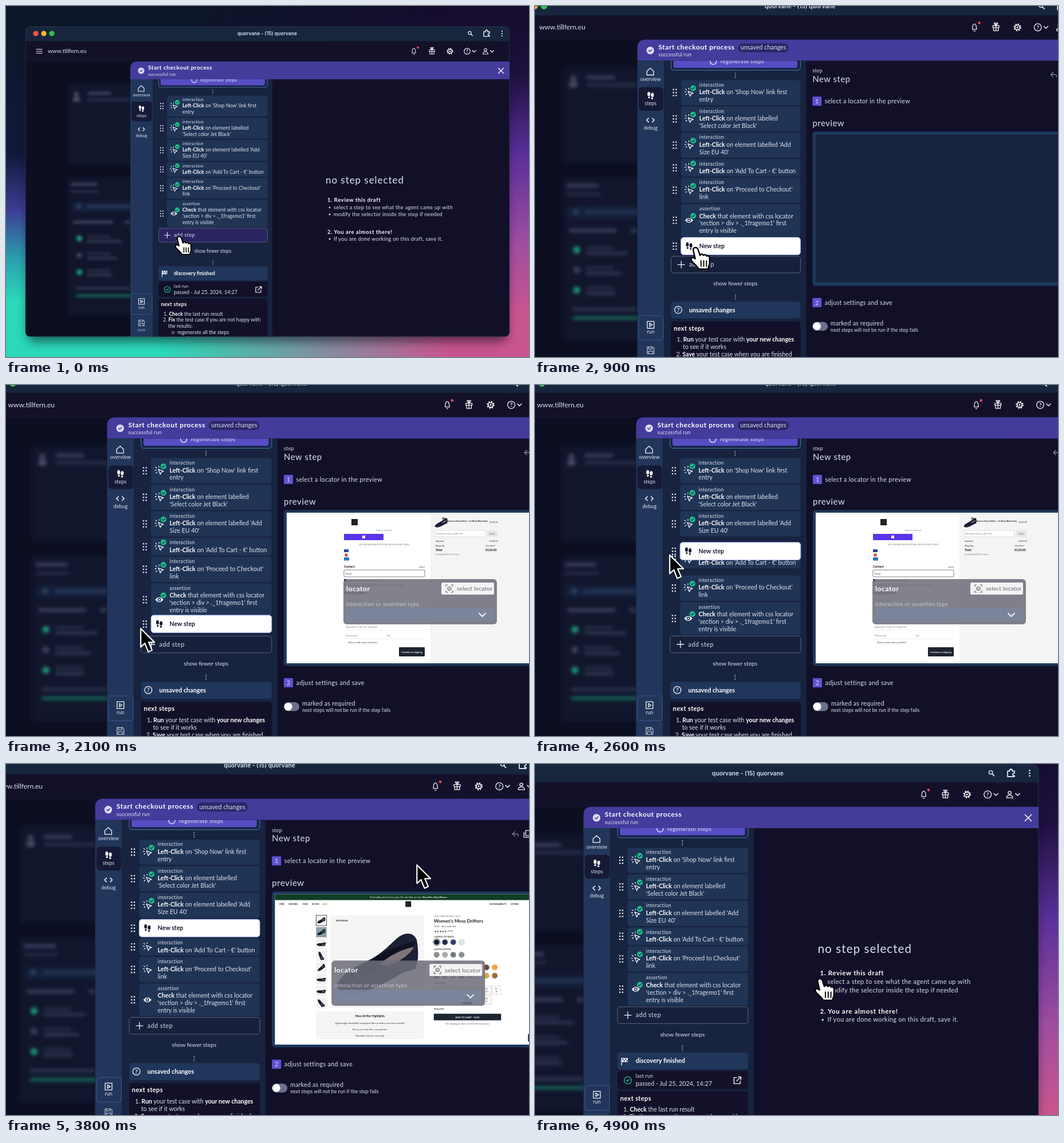
An HTML page that plays this animation: 913 by 613 pixels, repeating every 5 s.

```html
<!DOCTYPE html>
<html lang="en">
<head>
<meta charset="utf-8">
<title>Step editor</title>
<style>
  html, body { margin: 0; width: 100%; height: 100%; overflow: hidden; background: #0c1426; }
  svg { display: block; width: 100vw; height: 100vh; font-family: Lato, sans-serif; }
  text { white-space: pre; }
</style>
</head>
<body>
<svg id="stage" viewBox="0 0 913 613" fill="#dde2f0"></svg>
<script>
const stage = document.getElementById('stage');
const LOOP = 5000, FRAME = 100, ROW = 27.3;

// Drawing helpers; *stars* make bold text
const T = (x, y, size, str, o = '') =>
  `<text x="${x}" y="${y}" font-size="${size}" ${o}>${
    str.replace(/\*(.+?)\*/g, '<tspan font-weight="700" fill="#fff">$1</tspan>')}</text>`;
const S = (x, y, size, str, c = '#333', o = '') => T(x, y, size, str, `fill="${c}" ${o}`);
const R = (x, y, w, h, fill, r = 0, o = '') =>
  `<rect x="${x}" y="${y}" width="${w}" height="${h}" rx="${r}" fill="${fill}" ${o}/>`;
const C = (x, y, r, fill, o = '') => `<circle cx="${x}" cy="${y}" r="${r}" fill="${fill}" ${o}/>`;
const L = (d, w = 1.1, color = '#f2f3fa') =>
  `<path d="${d}" fill="none" stroke="${color}" stroke-width="${w}" stroke-linecap="round" stroke-linejoin="round"/>`;
const P = (d, fill, o = '') => `<path d="${d}" fill="${fill}" ${o}/>`;
const G = (id, body, o = '') => `<g id="${id}" ${o}>${body}</g>`;
const ring = (x, y, r, color = '#f2f3fa', w = 1.1) => C(x, y, r, 'none', `stroke="${color}" stroke-width="${w}"`);
const times = (n, f) => Array.from({ length: n }, (_, i) => f(i)).join('');
const each = (list, f) => list.map(f).join('');
const gap = n => `letter-spacing="${n}"`;
const MID = 'text-anchor="middle"', BOLD = 'font-weight="700"', MIDBOLD = MID + ' ' + BOLD;

// Icons
const tick = (x, y, color = '#fff', w = 1) => L(`M${x - 2} ${y}l1.5 1.6 2.6-3`, w, color);
const cross = (x, y, r, w = 1.4) => L(`M${x - r} ${y - r}l${2 * r} ${2 * r}M${x + r} ${y - r}l${-2 * r} ${2 * r}`, w);
const chevron = (x, y, r = 3, w = 1.2) => L(`M${x - r} ${y - r / 2}l${r} ${r} ${r}-${r}`, w);
const plus = (x, y) => L(`M${x - 5} ${y}h10M${x} ${y - 5}v10`);
const help = (x, y) => ring(x, y, 5.3) + T(x, y + 3, 8.5, '?', MIDBOLD);
const grip = (x, y) => times(6, i => C(x - 2 + i % 2 * 4, y - 4.4 + (i >> 1) * 4.4, 1.1, '#e4e6f2'));
const dots = (x, y) => times(3, i => C(x, y + i * 3, .7, '#d4d8e6'));
const feet = (x, y, c) => `<g fill="${c}"><ellipse cx="${x - 2.6}" cy="${y - 2}" rx="2.1" ry="3.2"/><ellipse cx="${x + 2.6}" cy="${y - .6}" rx="2.1" ry="3.2"/>` +
  C(x - 2.3, y + 3, 1.4, c) + C(x + 2.3, y + 4.4, 1.4, c) + '</g>';
const pointer = (x, y) => L(`M${x - 1.5} ${y - 2}l7.5 2.8-3.1 1.3-1.4 3.2zM${x - 4} ${y - 4}l-1.2-1.2M${x - 4.5} ${y - 1}h-1.6M${x - 3.5} ${y + 2}l-1.2 1.2M${x - .5} ${y - 5}v-1.5`);
const eye = (x, y) => P(`M${x - 6} ${y}q6-7 12 0q-6 7-12 0z`, '#f2f3fa') + C(x, y, 2.5, '#203455') + C(x, y, 1.1, '#fff');
const floppy = (x, y) => L(`M${x - 5} ${y - 5}h8l2 2v8h-10zM${x - 3} ${y + 5}v-4h6v4M${x - 3} ${y - 5}v3h5v-3`);

// Step list: top, height, lines
const steps = [
  [156.5, 36.6, ["*Left-Click* on 'Shop Now' link first", 'entry']],
  [195.2, 36.6, ['*Left-Click* on element labelled', "'Select color Jet Black'"]],
  [233.8, 36.6, ["*Left-Click* on element labelled 'Add", "Size EU 40'"]],
  [272.6, 25.6, ["*Left-Click* on 'Add To Cart - €' button"]],
  [300, 36.6, ["*Left-Click* on 'Proceed to Checkout'", 'link']],
  [338.8, 47.4, ['*Check* that element with css locator', "'section &gt; div &gt; ._1fragemo1' first", 'entry is visible']],
];
const card = ([y, h, lines], i) => {
  const m = y + h / 2, check = lines[0].startsWith('*Check');
  return G('step' + i, grip(272, m) + R(281, y, 175.5, h, '#203455', 4) +
    (check ? eye : pointer)(293, m) +
    G('ok' + i, C(299, m - 6.5, 4.2, '#1fbd8b') + tick(299, m - 6.5, '#123', .9)) +
    T(308, y + 9.4, 7.3, check ? 'assertion' : 'interaction', gap(.2)) +
    each(lines, (s, k) => T(308, y + 20.6 + k * 10.8, 8.8, s)));
};

const fade = (id, dir, stops) => `<linearGradient id="${id}" ${dir}>${
  each(stops, ([at, c]) => `<stop offset="${at}" stop-color="${c}"/>`)}</linearGradient>`;
const DOWN = 'x2="0" y2="1"';
const backdrop = `
  <defs>
    ${fade('left', DOWN, [[0, '#0c1728'], [.42, '#11193a'], [.58, '#3d3c94'], [.72, '#2a9fae'], [.84, '#2bd8b8'], [1, '#2bd8b8']])}
    ${fade('right', DOWN, [[0, '#140c2c'], [.2, '#1f1140'], [.42, '#5a2f9a'], [.68, '#a04ea0'], [.88, '#c9558f'], [1, '#c9558f']])}
    ${fade('across', '', [[.3, '#000'], [.85, '#fff']])}
    <mask id="blend">${R(0, 0, 913, 613, 'url(#across)')}</mask>
    <clipPath id="win">${R(34, 36, 845, 541.5, '#000', 8)}</clipPath>
    <clipPath id="col">${R(256, 128, 209, 450, '#000')}</clipPath>
    <clipPath id="shot">${R(490, 223, 466, 263, '#000')}</clipPath>
  </defs>
  ${R(0, 0, 913, 613, 'url(#left)')}
  ${R(0, 0, 913, 613, 'url(#right)', 0, 'mask="url(#blend)"')}
  ${R(38, 46, 837, 540, '#050714', 10, 'opacity=".55" style="filter:blur(9px)"')}`;

const titleBar = R(34, 36, 845, 25.5, '#17263d') +
  each(['#f2544d', '#f6b72e', '#33c148'], (c, i) => C(52 + i * 14, 48, 4.6, c)) +
  T(456, 51.2, 8.5, 'quorvane - (15) quorvane', `${MID} font-weight="600" font-family="Inter, sans-serif"`) +
  ring(809.5, 47, 2.6) + L('M811.6 49l2.8 2.8', 1.5) +
  L('M834 45h3q0-3 2-3t2 3h3v3q-2.5 0-2.5 1.8t2.5 1.8v1.5h-10z', 1.4) +
  times(3, i => C(866, 44 + i * 4, 1.1, '#fff'));

const nav = R(34, 61.5, 845, 36, '#131129') + L('M53 75.5h10M53 79h10M53 82.5h10', 1.2) +
  T(73, 82.3, 10, 'www.tillfern.eu') +
  L('M709 82q0-8 3-8t3 8zM711 84.5h2') + C(719, 72.5, 2, '#e8465a') +
  L('M739 76.5h9v3h-9zM740 79.5v4.5h7v-4.5M743.5 76.5v7.5M743.5 76q-4-3-2-3.5t2 3.5q4-3 2-3.5t-2 3.5') +
  ring(775, 79, 3.5, '#f2f3fa', 1.5) + C(775, 79, 4.9, 'none', 'stroke="#f2f3fa" stroke-width="1.6" stroke-dasharray="1.9 1.95"') + C(775, 79, 1.2, '#fff') +
  help(805, 79) + chevron(817, 79) +
  ring(837, 76.5, 2.2) + L('M832.5 84q0-4 4.5-4t4.5 4z') + chevron(848.5, 79);

const bar = (x, y, w, h = 5, c = '#39425e') => R(x, y, w, h, c, 2);
const behind = R(34, 97.5, 183, 480, '#0c0f22') + `<g style="filter:blur(2.5px)">` +
  R(107, 137, 120, 141, '#11162d', 5) + R(107, 299, 120, 241, '#11162d', 5) +
  C(123, 154, 4, '#4a5068') + R(117, 159, 12, 8, '#4a5068', 3) + bar(142, 150, 42) + bar(142, 161, 75, 5, '#283049') +
  bar(113, 309, 47) + bar(113, 322, 50, 4, '#283049') + R(115, 342, 110, 17, '#14203c', 4) + C(127, 350, 4, '#35445f') + bar(140, 348, 80, 4, '#2b3b5a') +
  bar(117, 375, 70) + bar(207, 375, 10) +
  each(['#1d9b78', '#3a435c', '#1d9b78'], (c, i) => C(128, 406 + i * 29.5, 5, c) + bar(141, 401 + i * 29.5, 42, 4, '#283049') + bar(141, 409 + i * 29.5, 62 - i * 9, 4, '#333b55')) +
  bar(122, 491, 95, 4, '#333b55') + bar(122, 504, 100, 4, '#16775f') + '</g>';

const header = P('M217 128V109q0-12 12-12H879v31z', '#433c9b') +
  C(236, 113, 5.6, '#dcd9f8') + tick(236, 113, '#433c9b', 1.3) +
  T(248, 111.3, 10, '*Start checkout process*', gap(.5)) + T(248, 122, 7.5, 'successful run', gap(.15)) +
  G('badge', R(365, 102.5, 74, 13, '#2b2668', 6.5) + T(402, 112, 9, 'unsaved changes', MID)) + cross(864, 113, 4.6);

const side = R(217, 128, 39, 450, '#21365a') +
  R(219, 167, 36, 34.5, '#151a35', 5) + L('M231 149v-5.5l5-4.5 5 4.5v5.5z') + T(236.5, 157.6, 7.5, 'overview', MID) +
  feet(236.5, 179, '#fff') + T(236.5, 193.5, 7.5, 'steps', MID) +
  L('M233.5 212.5l-2.8 2.8 2.8 2.8M239 212.5l2.8 2.8-2.8 2.8', 1.3) + T(236.5, 229, 7.5, 'debug', MID) +
  R(219, 502.5, 36, 36, 'none', 4, 'stroke="#3b5280"') + L('M231.5 511h10v10h-10zM235 513.5v5l4-2.5z') + T(236.5, 529, 7.5, 'run', MID) +
  `<g opacity=".7">${floppy(236.5, 553.5)}${T(236.5, 567.5, 7.5, 'save', MID)}</g>`;

const nextBox = lines => R(266.5, 511, 190, 80, '#121129', 4) + T(270.5, 524.3, 9.2, '*next steps*', gap(.3)) +
  each(lines, ([x, s], i) => T(x, 540.5 + i * 10.9, 8.8, s));

const column = R(256, 128, 209, 450, '#17233f') + `<g clip-path="url(#col)">` +
  R(266.5, 110, 190, 32, '#1a2348', 4, 'stroke="#4b86ae" stroke-width=".8"') + R(270, 110, 182, 28.5, '#574dc4', 3) +
  ring(328.5, 129, 4.6) + T(339, 132, 8.4, 'regenerate steps', gap(.2)) + dots(361, 146.5) +
  each(steps, card) +
  G('lower',
    R(266.5, 388, 190, 24.5, 'none', 4, 'id="add" stroke="#8f96b4" stroke-width=".8" stroke-dasharray="1.2 .8"') + plus(281.5, 400.2) +
    T(293, 403.2, 8.8, 'add step', gap(.5)) + T(361, 431, 8.5, 'show fewer steps', MID) + dots(361, 445) +
    R(266.5, 454.5, 190, 25, '#20365a', 4)) +
  G('settled',
    L('M272.5 462.5v10.5') + P('M272.5 462.5h9v6h-9z', '#f2f3fa') + times(4, i => R(273.5 + i * 2, 463.5 + i % 2 * 2, 1.6, 1.8, '#20365a')) +
    T(293, 470, 9, '*discovery finished*') + R(266.5, 481, 190, 27, '#121129', 4) + ring(281.5, 495, 5.3, '#22c590') + tick(281.5, 495, '#22c590', 1.2) +
    T(293, 491.7, 7.3, 'last run', gap(.2)) + T(293, 502.8, 9, 'passed - Jul 25, 2024, 14:27') +
    L('M440 491h-4v9h9v-4M442 490h4v4M446 490l-6 6', 1.2) +
    nextBox([[275, '1. *Check* the last run result'], [274, '2. *Fix* the test case if you are not happy with'], [283, 'the results:'], [289, '○  regenerate all the steps'], [289, '○  modify the steps']])) +
  G('unsaved', help(277, 494) + T(293, 497.3, 9, '*unsaved changes*') +
    nextBox([[275, '1. *Run* your test case with *your new changes*'], [284, 'to see if it works'], [274, '2. *Save* your test case when you are finished']])) +
  G('fresh', grip(272, 13) + R(281, 0, 175.5, 25.6, '#fff', 4, 'stroke="#aab4ee" stroke-width=".8"') + feet(293, 12.5, '#161a33') + S(308, 16, 8.8, 'New step', '#161a33', BOLD)) +
  '</g>';

const idle = T(558, 310, 17, 'no step selected', gap(.95)) +
  T(561, 342.3, 9.5, '*1. Review this draft*', gap(.6)) + T(561, 397.6, 9.5, '*2. You are almost there!*', gap(.6)) +
  each([[355, 'select a step to see what the agent came up with'], [367, 'modify the selector inside the step if needed'], [410, 'If you are done working on this draft, save it.']],
    ([y, s]) => C(565, y - 3, 1.4, '#dde2f0') + T(572, y, 9.2, s, gap(.25)));

// Preview pages and editor panel, in zoomed units
const shoe = P('M599 385C598 371 620 354 651 340C681 326 695 305 709 296C723 288 735 293 738 304C742 328 740 344 735 352C704 360 683 384 644 394C622 399 602 396 599 385Z', '#1c2034') +
  P('M640 354C664 331 692 316 735 305C737 318 704 351 664 358C652 360 641 359 640 354Z', '#10131f') +
  P('M672 346C688 332 709 320 733 315C728 326 708 342 687 349Z', '#7d757a') +
  L('M601 390C630 404 655 390 679 376C702 363 716 358 735 353', 1.6, '#0d1020');

const checkout = R(490, 223, 466, 263, '#fff') + R(741, 223, 215, 263, '#f4f4f4') + R(603, 234, 11, 11, '#222') +
  S(660, 255, 3.8, 'Express checkout', '#888', MID) + R(590, 260, 69, 11, '#5a34e8', 1) + R(622, 263, 5, 5, '#fff') +
  S(660, 280.5, 3.6, 'OR CONTINUE BELOW TO PAY WITH A CREDIT CARD', '#777', MID) +
  R(590, 287, 8, 5, '#2b4a9c') + C(594, 297, 2.7, '#e5472f') + R(590, 301, 9, 5.5, '#2673c8') +
  S(590, 319, 5.4, 'Contact', '#111', BOLD) + S(721, 319, 4, 'Log in', '#444') +
  R(590, 323, 141, 12, '#fff', 1, 'stroke="#666" stroke-width=".8"') + S(593, 331, 4.2, 'Email') +
  R(590, 339, 4.5, 4.5, '#111') + S(597, 343, 4, 'Email me with news and offers') + S(590, 351, 3.8, 'By continuing you agree to the Terms of Use and Privacy Policy.') +
  S(590, 365, 5.4, 'Shipping address', '#111', BOLD) +
  each(['Country/Region', 'First name', 'Address', 'Apartment, suite, etc. (optional)', 'Postal code'], (s, i) => S(593, 377 + i * 15.6, 4, s, '#777') + R(590, 381 + i * 15.6, 141, .5, '#ddd')) +
  S(664, 439, 4, 'City', '#777') + S(597, 451, 4, 'Text me with news and offers') +
  R(686, 458, 45, 16, '#1c2531', 1) + S(708.5, 467.7, 4, 'Continue to shipping', '#fff', MIDBOLD) +
  `<g transform="translate(656 187) scale(.155)">${shoe}</g>` + C(763.5, 233, 2.2, '#777') +
  S(769, 239.5, 3.5, "Women's Moss Drifters - Jet Black (Black Sole)", '#222', BOLD) + S(844, 241.5, 4, '€120.00') +
  R(749.5, 254, 87, 11, '#fff', 1, 'stroke="#ccc" stroke-width=".6"') + S(752, 261, 4, 'Discount code or gift card', '#777') + R(840, 254, 18, 11, '#e6e6e6', 1) + S(849, 261, 4, 'Apply', '#777', MID) +
  S(750, 274, 4, 'Subtotal') + S(844, 274, 4, '€120.00') + S(750, 282, 4, 'Shipping') + S(837, 282, 3.6, 'Calculated') +
  S(750, 290, 5.3, 'Total', '#111', BOLD) + S(837, 290, 5.3, '€120.00', '#111', BOLD) + S(750, 297, 3.8, 'Including €20.00 in taxes', '#777');

const swatchRow = (y, colors) => each(colors, (c, i) => C(772.5 + i * 14.5, y, 5, c, 'stroke="#ccc" stroke-width=".6"'));
const product = R(490, 223, 466, 263, '#fff') + R(490, 223, 466, 10.5, '#0f3d25') +
  S(723, 230, 3.8, 'Tread softly and feel every step. Our new flats are here. *Shop Men | Shop Women*', '#fff', MID) +
  each([[498, 'MEN'], [514, 'WOMEN'], [539, 'KIDS'], [555, 'SOCKS'], [573, 'SALE'], [865, 'SUSTAINABILITY'], [902, 'STORES']],
    ([x, s]) => S(x, 242, 3.8, s, s == 'SALE' ? '#c28a1e' : '#222', BOLD)) + R(718, 235.5, 10, 10, '#222') +
  times(8, i => R(562, 260 + i * 20.6, 18.5, 18, i == 1 ? '#8aa0a8' : '#f1f1f1', 0, i ? '' : 'stroke="#333" stroke-width=".8"') +
    `<g transform="translate(571 ${269 + i * 20.6}) rotate(${[0, 0, 25, 95, -10, 28, 28, 80][i]}) scale(.1) translate(-669 -346)">${shoe}</g>`) +
  R(587, 260, 164, 162, '#f5f5f5') + S(597, 271, 3.6, 'BESTSELLER', '#222', BOLD) + shoe +
  each([-1, 1], k => C(730 + 8 * k, 411, 5.5, '#fff', 'stroke="#ddd" stroke-width=".5"') + L(`M${730 + 7.2 * k} 409l${1.6 * k} 2l${-1.6 * k} 2`, .8, '#333')) +
  R(562, 428, 189, 48, '#f5f5f5') + S(656, 438, 5, 'Moss Drifter Highlights', '#222', MIDBOLD) +
  each(['Lightweight, breathable eucalyptus fiber provides next-level comfort', 'Fits to your foot like a second skin', 'Reusable shoe for every day'], (s, i) => S(656, 450 + i * 11, 4.1, s, '#333', MID) + R(570, 453 + i * 11, 172, .4, '#ddd')) +
  S(768, 263, 3.3, "Home / Women's Shoes / Flats /", '#555') + S(767.5, 273, 8.3, "Women's Moss Drifters", '#1b1f2b', BOLD) +
  S(768, 281, 4, '€120    Best-seller flat') + S(768, 290, 5, '★★★★★') + S(791, 289, 3.5, '(1131)') +
  each([[299, 'CLASSICS: JET BLACK'], [320.5, 'LIMITED EDITION'], [342.5, 'DEALS'], [380, 'SELECT SIZE'], [425, 'Sizing Help']], ([y, s]) => S(768, y, 3.5, s, '#333', BOLD)) +
  swatchRow(307, ['#161c30', '#262d4c', '#33406f', '#e2e3e6']) + ring(772.5, 307, 6.3, '#222', .6) +
  swatchRow(329, ['#8b8f92', '#a9aaa6', '#6f7a80', '#8a8c92']) +
  swatchRow(351, ['#d8b48a', '#e0a24a', '#d95030', '#3f4656', '#8c8f99', '#d9dade', '#6d4638', '#f0a53a']) +
  swatchRow(365.5, ['#7d3b3b', '#3a6fa0', '#c9a27c', '#8d5560', '#a0a4ad', '#cfd3da', '#e0a83c', '#a06a3c']) +
  times(13, i => {
    const x = 767.5 + i % 7 * 16.9, y = i < 7 ? 384 : 401, on = i == 10, ink = on ? '#fff' : '#444';
    return R(x, y, 15.5, 14.5, on ? '#1b2430' : '#fff', 0, 'stroke="#bbb" stroke-width=".6"') +
      S(x + 7.7, y + 6.3, 3.3, 'EU', ink, MID) + S(x + 7.7, y + 11, 3.3, `${35 + i / 2}`, ink, MID);
  }) +
  R(767.5, 432, 117.5, 11.5, '#1c2631') + S(826, 439.5, 4.3, 'ADD TO CART - €120', '#fff', MIDBOLD) +
  S(826, 450.5, 3.5, 'Free shipping on orders over €75 and easy returns', '#555', MID) + R(932, 467, 20, 14, '#1c2631', 2);

const locator = R(589, 339, 268, 79, '#6d6e7a', 6, 'opacity=".86"') + T(594, 360, 12, '*locator*', gap(.6)) +
  R(760, 345, 92, 21, '#f3f3f6', 2) + ring(774, 355.5, 3, '#666') + C(774, 355.5, 1, '#666') +
  L('M768 352v-3h3M777 349h3v3M780 359v3h-3M771 362h-3v-3', 1.1, '#666') + S(787, 359.5, 10.4, 'select locator', '#666', gap(.1)) +
  T(594, 386, 9.4, 'interaction or assertion type', gap(.4) + ' opacity=".75"') + R(594, 390, 258, 22, '#7c869f', 3, 'opacity=".85"') + chevron(831.5, 401.5, 5.5, 2);

const number = (n, y) => R(485, y, 16, 16, '#6053d2', 1) + T(493, y + 11.8, 10.5, `${n}`, MID);
const editor = T(485, 114.5, 9, 'step', gap(.2)) + T(485, 131, 14.9, 'New step', gap(.6)) +
  L('M915 122v-2q0-2-3-2h-7l4-4M905 118l4 4', 1.3, '#8a8ca6') + L('M928 112h9v9h-9zM925 115v9h9', 1.3) + L('M950 114h10M953 113v-2h4v2M951 114v10h8v-10', 1.5) +
  number(1, 157) + T(506.5, 168.7, 10.8, 'select a locator in the preview', gap(.3)) +
  T(485, 209, 15, 'preview', gap(.6)) +
  R(486, 219.5, 476, 270, '#16243f', 4, 'stroke="#1d3a5c" stroke-width="2"') + R(489, 222.5, 469, 264, '#16243f', 1, 'stroke="#1d3a5c" stroke-width="4"') +
  `<g clip-path="url(#shot)">${G('checkout', checkout)}${G('product', product)}${G('locator', locator)}</g>` +
  number(2, 512) + T(506.5, 524, 10.8, 'adjust settings and save', gap(.3)) +
  R(485, 554, 27, 15.5, '#6c718b', 7.7) + C(492.7, 561.7, 7, '#fff') +
  T(517, 560, 10.6, 'marked as required', gap(.25)) + T(517, 571.3, 8.6, 'next steps will not be run if the step fails', gap(.05));

const dialog = R(222, 285, 301, 114, '#6a6adf', 12, 'style="filter:blur(4px)"') + R(222, 285, 301, 114, '#17213c', 12, 'stroke="#3f4488"') +
  T(233, 310, 14.5, 'delete step?', gap(.85)) + cross(504, 305.5, 5.8, 1.6) + T(233, 336, 11, 'Are you sure you want to delete this step?', gap(.45)) +
  T(393, 379, 11, 'cancel', MID + ' ' + gap(.5)) + R(426, 361.5, 86, 27, '#b0203a', 6) + T(469, 379, 10.6, 'yes, delete it', MID + ' ' + gap(.6));

const hand = P('M-3 2C-3-2 2-3 4 1L7 10C9 7 11 8 12 10C14 8 16 9 17 11C19 10 21 11 21 14V22C21 25 19 26 19 30H5C4 26-3 22-6 17C-7 13-3 12 0 15Z', '#fff', 'stroke="#000" stroke-width="2" stroke-linejoin="round"') +
  L('M8.5 18v8M12.5 18v8M16.5 18v8', 1.6, '#000');
const arrow = P('M0 0V27L6 21.5L11 34L16.5 31.5L11.5 20H20Z', '#000', 'stroke="#fff" stroke-width="1.8" stroke-linejoin="round"');

const zoomed = (x, y) => `transform="translate(${x} ${y}) scale(.83333)"`;
stage.innerHTML = G('cam', backdrop + '<g clip-path="url(#win)">' +
  G('app', nav + behind + R(217, 128, 662, 450, '#120f29') + header + side + column + G('idle', idle) + G('editor', editor, zoomed(70, 50))) +
  G('shade', R(34, 61.5, 845, 516, '#0e1236', 0, 'opacity=".44"')) + titleBar + G('dialog', dialog, zoomed(146, 34.67)) + '</g>' +
  R(34, 36, 845, 541.5, 'none', 8, 'stroke="#4a5a72" stroke-opacity=".6" stroke-width=".7"') +
  G('cursor', G('hand', hand) + G('arrow', arrow)));

// Motion
const el = {};
stage.querySelectorAll('[id]').forEach(n => el[n.id] = n);
const clamp = u => Math.min(1, Math.max(0, u));
const ease = u => u * u * (3 - 2 * u);
const show = (id, on) => el[id].style.display = on ? '' : 'none';
const move = (id, x, y, s = 1) => el[id].setAttribute('transform', `translate(${x} ${y}) scale(${s})`);
const track = (keys, t) => {
  let i = 0;
  while (i < keys.length - 2 && t >= keys[i + 1][0]) i++;
  const [a, b] = [keys[i], keys[i + 1]], u = ease(clamp((t - a[0]) / (b[0] - a[0])));
  return a.slice(1).map((v, k) => v + (b[k + 1] - v) * u);
};

const camera = [[0, 0, 0, 1], [1050, -84, -60, 1.2], [3600, -84, -60, 1.2], [4250, -175.8, -41.6, 1.2]];
const mouse = [[0, 302, 404], [1550, 302, 404], [1900, 266, 407], [2050, 266, 407], [2600, 266, 297.5], [2750, 265, 293],
  [3450, 265, 293], [4000, 865.5, 150.5], [4200, 865.5, 150.5], [4550, 560.5, 348.5]];
const drag = [[0, 387.5], [2050, 387.5], [2600, 279], [2750, 272.6]];

function draw() {
  const t = Math.floor(performance.now() % LOOP / FRAME) * FRAME;
  const draft = t >= 500 && t < 4700, modal = t >= 4100 && t < 4700;
  const [top] = track(drag, t);

  move('cam', ...track(camera, t));
  move('cursor', ...track(mouse, t));
  show('hand', t < 1700 || t >= 3900);
  show('arrow', t >= 1700 && t < 3900);

  ['badge', 'fresh', 'editor', 'unsaved'].forEach(id => show(id, draft));
  ['idle', 'settled'].forEach(id => show(id, !draft));
  el.add.setAttribute('fill', t < 500 ? '#2a2560' : '#17213b');
  move('lower', 0, draft ? ROW : 0);
  move('fresh', 0, top);
  steps.forEach(([y], i) => {
    move('step' + i, 0, draft && i > 2 ? ROW * clamp((y + 19.4 - top) / 19.4) : 0);
    show('ok' + i, i < 3 || !draft || t < 2800);
  });

  show('checkout', t >= 1200 && t < 2900);
  show('product', t >= 2900);
  show('locator', t >= 1200 && t < 2900 || t >= 3500);
  show('dialog', modal);
  show('shade', modal);
  el.app.style.filter = modal ? 'blur(2.2px)' : '';
  requestAnimationFrame(draw);
}
draw();
</script>
</body>
</html>
```
